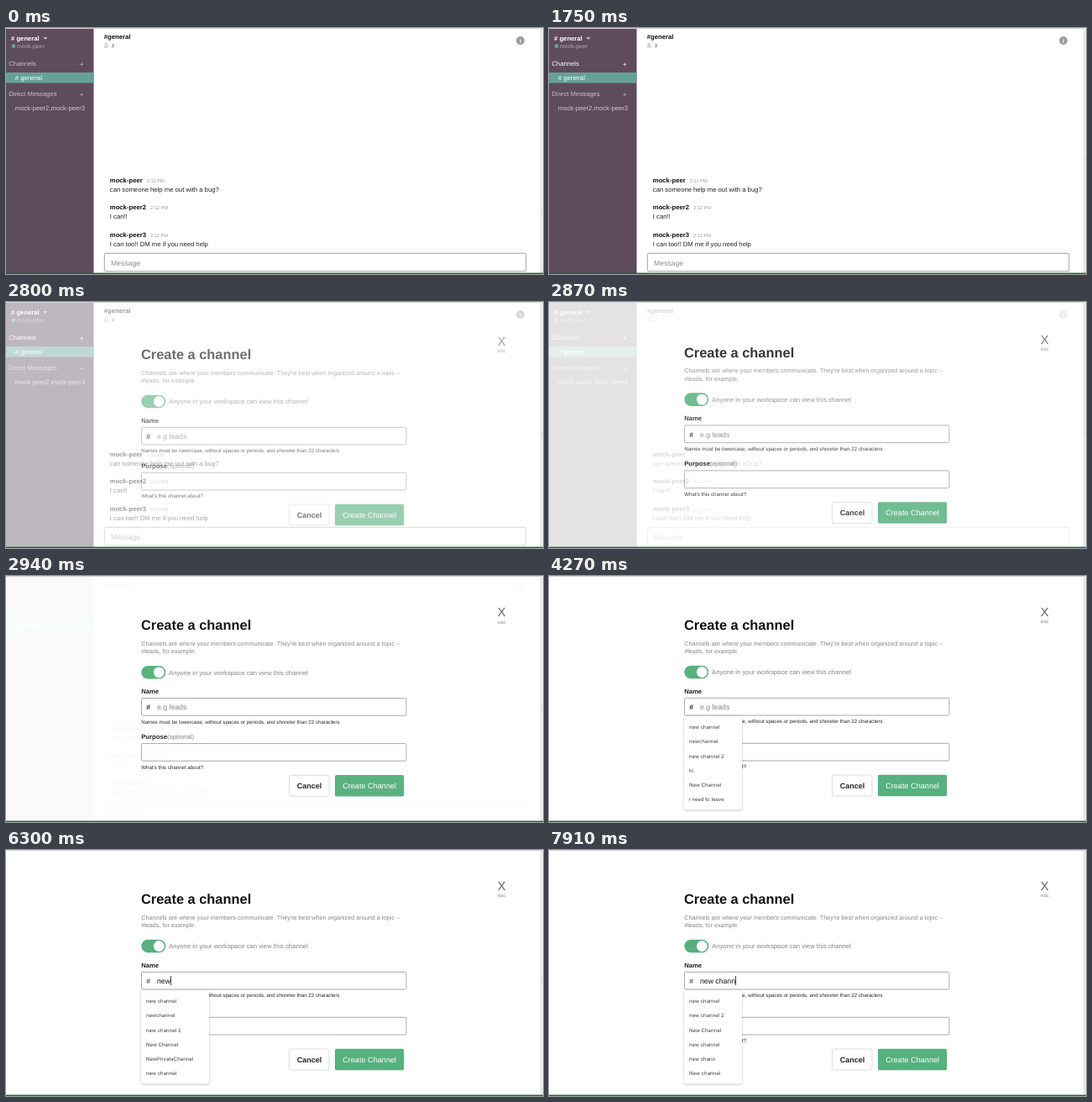
An HTML page with a canvas that plays this animation: 640x293 px, repeating every 8000 ms.

```html
<!DOCTYPE html>
<html lang="en">
<head>
<meta charset="utf-8">
<title>Create a channel</title>
<style>
  html, body { margin: 0; width: 100%; height: 100%; overflow: hidden; background: #fff; }
  canvas { display: block; width: 640px; height: 293px; }
</style>
</head>
<body>
<canvas id="stage"></canvas>
<script>
const W = 640, H = 293, LOOP = 8000, TICK = 70;
const SANS = '"Liberation Sans", Arial, sans-serif';
const MENU = 'Inter, Roboto, sans-serif';
const GREEN = '#57b07e', PLUM = '#5e4b5d', TEAL = '#65a199';
const ratio = window.devicePixelRatio || 1;

function prepare(canvas) {
  canvas.width = W * ratio;
  canvas.height = H * ratio;
  const g = canvas.getContext('2d');
  g.scale(ratio, ratio);
  g.textRendering = 'geometricPrecision';
  return g;
}

const stage = document.getElementById('stage');
const layer = document.createElement('canvas');
const main = prepare(stage), modal = prepare(layer);

// y is the middle of the capital letters; returns the text width.
function text(g, str, x, y, size, color, { bold, align = 'left', face = SANS } = {}) {
  g.font = `${bold ? 'bold ' : ''}${size}px ${face}`;
  g.textAlign = align;
  g.fillStyle = color;
  g.fillText(str, x, y + size * 0.36);
  return g.measureText(str).width;
}

function rect(g, x, y, w, h, color) {
  g.fillStyle = color;
  g.fillRect(x, y, w, h);
}

function box(g, x, y, w, h, r, fill, stroke) {
  g.beginPath();
  g.roundRect(x, y, w, h, r);
  if (fill) { g.fillStyle = fill; g.fill(); }
  if (stroke) { g.strokeStyle = stroke; g.lineWidth = 1; g.stroke(); }
}

function dot(g, x, y, r, color) {
  g.beginPath();
  g.arc(x, y, r, 0, Math.PI * 2);
  g.fillStyle = color;
  g.fill();
}

// Latest entry of a [time, value] list that has begun.
function latest(steps, t) {
  let value = steps[0][1];
  for (const [start, v] of steps) if (t >= start) value = v;
  return value;
}

const typing = [
  [0, ''], [5110, 'n'], [5180, 'ne'], [5250, 'new'], [6580, 'new '], [6720, 'new c'],
  [7000, 'new ch'], [7630, 'new cha'], [7770, 'new chan'], [7910, 'new chann']
];
const caretSteps = [
  [0, false], [3710, true], [4270, false], [4760, true], [5810, false],
  [6300, true], [7560, false], [7630, true]
];
const menuSteps = [
  [0, null],
  [3850, { w: 69, items: ['new channel', 'newchannel', 'new channel 2', 'hi', 'New Channel', 'i need to leave'] }],
  [5110, { w: 81, items: ['new channel', 'newchannel', 'new channel 2', 'New Channel', 'NewPrivateChannel', 'new channel'] }],
  [6580, { w: 69, items: ['new channel', 'new channel 2', 'New Channel', 'new channel', 'new chann', 'New channel'] }]
];
const messages = [
  ['mock-peer', 'can someone help me out with a bug?'],
  ['mock-peer2', 'I can!!'],
  ['mock-peer3', 'I can too!! DM me if you need help']
];

function drawSidebar(g, hover) {
  const soft = '#c9c0c9';
  rect(g, 0, 0, 104.5, H, PLUM);
  text(g, '# general', 6, 12, 7.7, '#fff', { bold: true });
  g.beginPath();
  g.moveTo(44.3, 11);
  g.lineTo(49.3, 11);
  g.lineTo(46.8, 13.7);
  g.fillStyle = soft;
  g.fill();
  dot(g, 9, 21.5, 2.4, TEAL);
  text(g, 'mock-peer', 13, 21.2, 6.95, '#b3a8b3');

  const lit = hover ? '#fff' : soft;
  text(g, 'Channels', 3.3, 42.5, 7.7, lit);
  text(g, '+', 90.2, 42.8, 8.4, lit, { align: 'center' });
  rect(g, 0, 53, 104.5, 12.5, TEAL);
  text(g, '# general', 10.8, 59, 7.7, '#fff');
  text(g, 'Direct Messages', 3.3, 78.5, 7.7, soft);
  text(g, '+', 90.2, 78.8, 8.4, soft, { align: 'center' });
  text(g, 'mock-peer2,mock-peer3', 10.8, 94.8, 7.7, '#d2cad2');
}

function drawChat(g) {
  text(g, '#general', 116.8, 10, 7.7, '#111', { bold: true });
  g.strokeStyle = '#999';
  g.lineWidth = 0.6;
  g.beginPath();
  g.arc(119.3, 19.2, 1.4, 0, Math.PI * 2);
  g.moveTo(116.9, 23);
  g.quadraticCurveTo(119.3, 18.8, 121.7, 23);
  g.closePath();
  g.stroke();
  text(g, '3', 125.7, 20.6, 5.7, '#333');

  dot(g, 613, 15, 4.9, '#9b9b9b');
  text(g, 'i', 613, 15, 7.6, '#fff', { bold: true, align: 'center' });

  messages.forEach(([name, line], i) => {
    const y = 181 + i * 32.5;
    const w = text(g, name, 123.8, y, 7.7, '#111', { bold: true });
    text(g, '2:12 PM', 123.8 + w + 5, y + 0.6, 5.65, '#999');
    text(g, line, 123.8, y + 11.2, 7.7, '#222');
  });
  box(g, 117.3, 268.3, 502.5, 21.5, 2, '#fff', '#a2a2a2');
  text(g, 'Message', 125, 279.7, 8.65, '#8a8a8a');
}

function drawMenu(g, { w, items }) {
  g.save();
  g.shadowColor = 'rgba(0,0,0,.28)';
  g.shadowBlur = 2.5 * ratio;
  g.shadowOffsetY = 0.8 * ratio;
  box(g, 161, 167, w, 111.5, [0, 0, 2, 2], '#fff');
  g.restore();
  items.forEach((item, i) =>
    text(g, item, 167, 180 + i * 17.25, 6.05, '#3c3c3c', { face: MENU }));
}

function drawModal(g, t) {
  const typed = latest(typing, t), menu = latest(menuSteps, t);
  rect(g, 0, 0, W, H, '#fff');
  text(g, 'X', 590.8, 42.7, 14.8, '#666', { align: 'center' });
  text(g, 'esc', 590.8, 54, 6.3, '#888', { align: 'center' });

  text(g, 'Create a channel', 161, 58.2, 16.4, '#111', { bold: true });
  text(g, "Channels are where your members communicate. They're best when organized around a topic --",
    161.2, 80, 7.23, '#858585');
  text(g, '#leads, for example.', 161.2, 89.5, 7.23, '#858585');

  box(g, 161.3, 106.7, 29, 15.6, 7.8, GREEN);
  dot(g, 182.3, 114.5, 6.4, '#fff');
  text(g, 'Anyone in your workspace can view this channel', 194, 114.6, 7.72, '#858585');

  text(g, 'Name', 161.2, 136.8, 7.7, '#222', { bold: true });
  box(g, 161.5, 145.3, 315.5, 20.7, 1.5, '#fff', '#a8a8a8');
  text(g, '#', 167.3, 156, 8.5, '#222', { bold: !typed });
  const w = text(g, typed || 'e.g leads', 180, 156, 8.7, typed ? '#111' : '#808080');
  if (latest(caretSteps, t)) rect(g, 180 + (typed ? w : 0), 150, 0.8, 11, '#111');
  text(g, 'Names must be lowercase, without spaces or periods, and shoreter than 22 characters',
    161.2, 173.2, 6.17, '#222');

  const p = text(g, 'Purpose', 161.2, 190.8, 7.7, '#222', { bold: true });
  text(g, '(optional)', 161.2 + p, 190.8, 7.7, '#858585');
  box(g, 161.5, 199.3, 315.5, 20.7, 1.5, '#fff', '#a8a8a8');
  text(g, "What's this channel about?", 161.2, 227, 6.18, '#222');

  box(g, 337.5, 237, 47.5, 25, 2, '#fff', '#dcdcdc');
  text(g, 'Cancel', 361.4, 249.4, 9, '#222', { bold: true, align: 'center' });
  box(g, 392, 236.7, 82.3, 25.5, 2, GREEN);
  text(g, 'Create Channel', 433.1, 249.4, 9.14, '#fff', { align: 'center' });
  if (menu) drawMenu(g, menu);
}

function drawEdges(g, t) {
  rect(g, 0, 0, W, 1, '#d4d4d4');
  rect(g, 637, 0, 3, H, '#ececec');
  rect(g, 637, 0, 1, H, '#dedede');
  if (t < 1330) rect(g, 638, 219, 2, 1, '#cfcfcf');
  else rect(g, 638, 155, 2, 1, '#cfcfcf');
  rect(g, 0, 291.6, W, 1.4, '#15701c');
}

function draw(now) {
  const t = Math.floor((now % LOOP) / TICK) * TICK;
  const p = Math.min(1, Math.max(0, (t - 2690) / 300));
  const shown = t < 2730 ? 0 : 1 - (1 - p) ** 2;

  rect(main, 0, 0, W, H, '#fff');
  if (shown < 1) {
    drawSidebar(main, t >= 1750);
    drawChat(main);
  }
  if (shown > 0) {
    // The panel rises into place while it fades in.
    modal.save();
    rect(modal, 0, 0, W, H, '#fff');
    modal.translate(0, 10 * (1 - shown));
    drawModal(modal, t);
    modal.restore();
    main.globalAlpha = shown;
    main.drawImage(layer, 0, 0, W, H);
    main.globalAlpha = 1;
  }
  drawEdges(main, t);
}

const begin = performance.now();
function frame() {
  draw(performance.now() - begin);
  requestAnimationFrame(frame);
}
frame();
</script>
</body>
</html>
```
